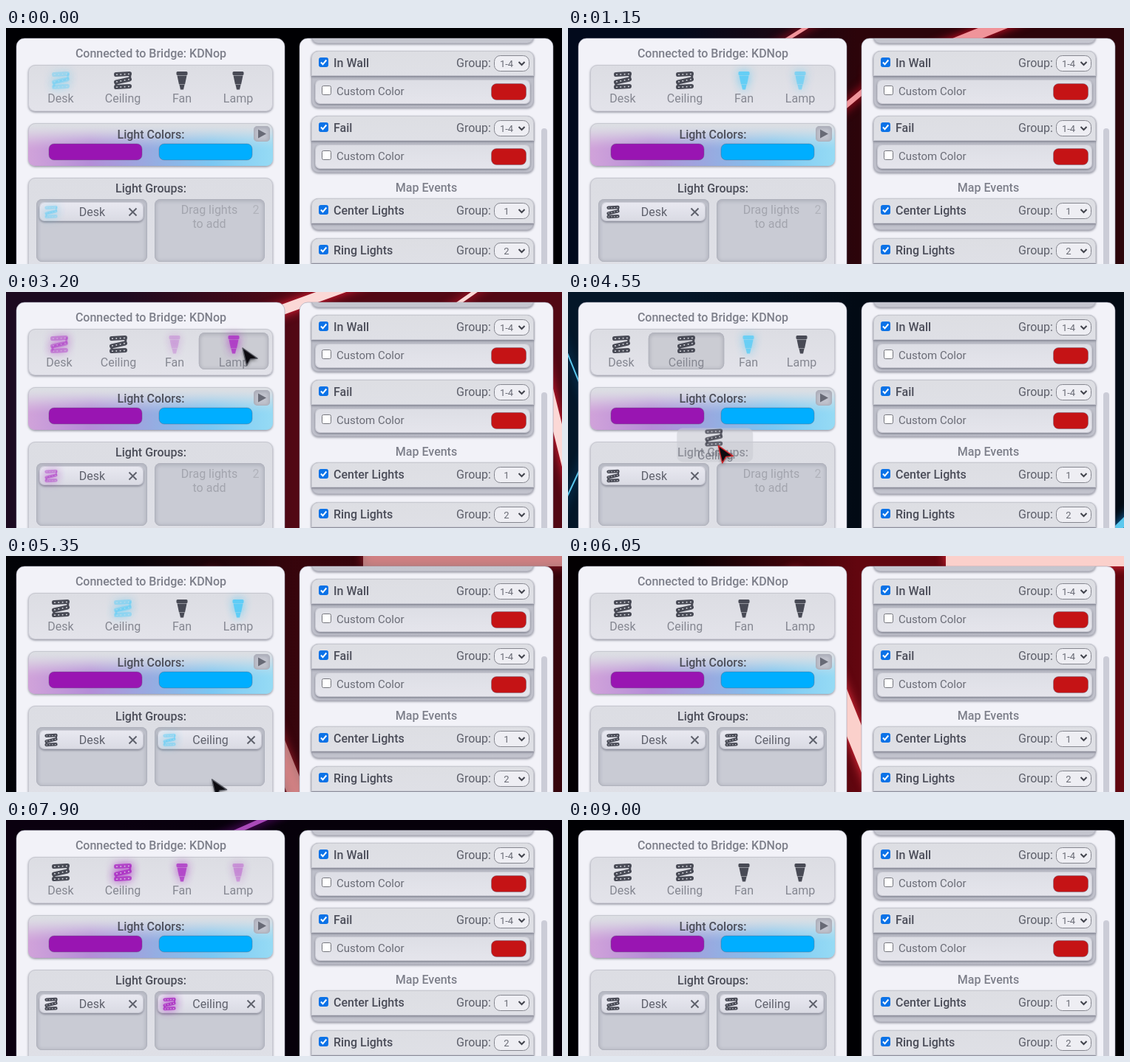
These frames come from a looping animation (752x320 px, 9050 ms). An HTML page with a canvas:

```html
<!DOCTYPE html>
<html lang="en">
<head>
<meta charset="utf-8">
<title>Light control panel</title>
<style>
html, body { margin: 0; width: 100%; height: 100%; overflow: hidden; background: #000; }
canvas { display: block; width: 100vw; height: 100vh; }
</style>
</head>
<body>
<canvas id="stage" width="752" height="320"></canvas>
<script>
const ctx = document.getElementById('stage').getContext('2d');
const LOOP = 9050, STEP = 50, PULSE = 500;
const CYAN = '#58cdf8', PURPLE = '#ae35c6', DARK = '#484a55';

// Each lamp flashes at its own rhythm
const LAMPS = [
  { name: 'Desk', x: 74, period: 3250, phase: 400, paint: strip },
  { name: 'Ceiling', x: 158, period: 2800, phase: 600, paint: strip },
  { name: 'Fan', x: 238, period: 1680, phase: 630, paint: bulb },
  { name: 'Lamp', x: 314, period: 2200, phase: 1300, paint: bulb }
];

// Pointer stops; it rests at each before moving on
const REST = 200;
const STOPS = [
  { at: 2600, x: 345, y: 350 },
  { at: 3150, x: 320, y: 76 },
  { at: 3900, x: 164, y: 79 },
  { at: 5000, x: 275, y: 262 },
  { at: 5700, x: 310, y: 350 }
];
const PICK = STOPS[2], GRAB = PICK.at + REST, DROP = STOPS[3].at + REST / 2;

// Backdrop moods; rays are x, y, degrees, width
const MOODS = [
  { at: 1150, left: '#020a1c', right: '#2c040a', ray: '#f0949a', glow: '#e01028',
    rays: [[308, 8, -32, 5], [555, 8, -22, 15], [388, 95, -40, 7]] },
  { at: 3200, left: '#1c0a20', right: '#520814', ray: '#fbd8d6', glow: '#f02038',
    rays: [[415, 9, -20, 14], [745, 180, 76, 14], [625, 6, -35, 5]] },
  { at: 4550, left: '#041628', right: '#020a14', ray: '#5cc8ee', glow: '#1080d0',
    rays: [[6, 100, 68, 2], [6, 262, -65, 2], [748, 316, -45, 10]] },
  { at: 6050, left: '#030002', right: '#62060f', ray: '#fbd0cb', glow: '#f03040',
    rays: [[387, 237, 68, 24], [775, 0, 0, 28]] },
  { at: 7900, left: '#0a000f', right: '#06000a', ray: '#a94aba', glow: '#8a10a8',
    rays: [[340, 3, -24, 6]] }
];

const clamp = v => Math.max(0, Math.min(1, v));
const ease = v => { v = clamp(v); return v * v * (3 - 2 * v); };

function box(x, y, w, h, r) {
  ctx.beginPath();
  ctx.roundRect(x, y, w, h, r);
}

function lines(points, close) {
  ctx.beginPath();
  points.forEach(p => ctx.lineTo(p[0], p[1]));
  if (close) ctx.closePath();
}

function gradient(x1, y1, x2, y2, ...colors) {
  const g = ctx.createLinearGradient(x1, y1, x2, y2);
  colors.forEach((c, i) => g.addColorStop(i / (colors.length - 1), c));
  return g;
}

function shade(color, blur, dy = 0) {
  ctx.shadowColor = color;
  ctx.shadowBlur = blur;
  ctx.shadowOffsetY = dy;
}

function stroke(color, width) {
  ctx.strokeStyle = color;
  ctx.lineWidth = width;
  ctx.stroke();
}

function fill(color) {
  ctx.fillStyle = color;
  ctx.fill();
}

function raised(x, y, w, h, r, top = '#dcdde3', bottom = '#e3e3ea') {
  ctx.save();
  shade('rgba(60,62,80,.5)', 3, 1.5);
  box(x, y, w, h, r);
  fill(gradient(0, y, 0, y + h, top, bottom));
  ctx.restore();
  box(x + .5, y + .5, w - 1, h - 1, r);
  stroke('rgba(130,132,148,.25)', 1);
}

function sunken(x, y, w, h, r, color) {
  ctx.save();
  box(x, y, w, h, r);
  fill(color);
  ctx.clip();
  shade('rgba(70,72,90,.5)', 5, 1);
  box(x - .5, y - .5, w + 1, h + 1, r);
  stroke('#a9abb6', 2);
  ctx.restore();
}

function text(str, x, y, color, align = 'left', weight = 400, size = 16) {
  ctx.font = `${weight} ${size}px Roboto, sans-serif`;
  ctx.textAlign = align;
  ctx.fillStyle = color;
  ctx.fillText(str, x, y);
}

function backdrop(t) {
  ctx.fillStyle = '#000003';
  ctx.fillRect(0, 0, 752, 320);
  for (const { at, left, right, ray, glow, rays } of MOODS) {
    ctx.save();
    ctx.globalAlpha = clamp(2.5 * (1 - Math.abs(t - at) / 900));
    ctx.fillStyle = gradient(150, 0, 390, 0, left, right);
    ctx.fillRect(0, 0, 752, 320);
    shade(glow, 14);
    for (const [x, y, angle, w] of rays) {
      ctx.save();
      ctx.translate(x + (t - at) * .04, y);
      ctx.rotate(angle * Math.PI / 180);
      const reach = 40 + 8 * w;
      lines([[-reach, 0], [reach, 0]]);
      stroke(ray, w);
      ctx.restore();
    }
    ctx.restore();
  }
}

function strip(color) {
  ctx.lineCap = ctx.lineJoin = 'round';
  lines([[10, -8.5], [9.5, -2], [-9, 3], [-9, 8.5]]);
  stroke(color, 3);
  for (const [left, right] of [[-8, -9], [2.5, -1.5], [9, 8]]) {
    lines([[-9, left], [9, right]]);
    stroke(color, 6);
  }
  shade('transparent', 0);
  ctx.fillStyle = '#e2e3e9';
  for (let i = 0; i < 12; i++) {
    const x = -8 + 5.3 * (i % 4), row = Math.floor(i / 4) - 1;
    ctx.fillRect(x - .8, row * 8.5 - x * (row ? .05 : .2) - .5, 1.6, 1.6);
  }
}

function bulb(color) {
  box(-7.5, -12, 15, 5, 1.5);
  fill(color);
  lines([[-6.5, -6.5], [6.5, -6.5], [4, 5.5], [-4, 5.5]], true);
  fill(color);
  lines([[-3.5, 6], [3.5, 6], [2, 12.5], [-2, 12.5]], true);
  fill(color);
}

function icon(lamp, x, y, t, scale = 1) {
  const age = (t + lamp.phase) % lamp.period, lit = age < PULSE;
  const beat = (t - age + LOOP) % LOOP % 5000;
  const color = !lit ? DARK : t > age && beat >= 2400 && beat < 3700 ? PURPLE : CYAN;
  ctx.save();
  ctx.translate(x, y);
  ctx.scale(scale, scale);
  if (lit) {
    ctx.globalAlpha = 1 - .8 * age / PULSE;
    shade(color, 12);
  }
  lamp.paint(color);
  ctx.restore();
}

function pointerAt(t) {
  const i = STOPS.findIndex(s => s.at > t);
  if (i < 1) return null;
  const a = STOPS[i - 1], b = STOPS[i], from = a.at + REST;
  const k = ease((t - from) / (b.at - from));
  // Height leads, so moves follow an arc
  return { x: a.x + (b.x - a.x) * k ** 1.5, y: a.y + (b.y - a.y) * k ** .5 };
}

const isDragging = t => t >= GRAB && t < DROP;

function lampRow(t, pointer) {
  raised(30, 50, 331, 63, 9);
  const focus = isDragging(t) ? PICK : pointer;
  const last = LAMPS.length - 1;
  const hover = LAMPS.map(l => focus && focus.y < 113 ? ease((46 - Math.abs(focus.x - l.x)) / 16) : 0);
  // The hovered tile widens by what the others give up
  const shift = (i, h) => i < h ? -4 * i - 2 : i > h ? 4 * (last - i) + 2 : 2 * last - 4 * h;
  LAMPS.forEach((lamp, i) => {
    const x = hover.reduce((sum, w, h) => sum + w * shift(i, h), lamp.x);
    ctx.font = '16px Roboto, sans-serif';
    const w = ctx.measureText(lamp.name).width + 54;
    ctx.save();
    ctx.globalAlpha = hover[i];
    if (hover[i]) sunken(x - w / 2, 55, w, 50, 8, '#cbccd3');
    ctx.restore();
    icon(lamp, x, 71, t);
    text(lamp.name, x, 101, '#858791', 'center');
  });
}

function swatch(x, y, w, h, color) {
  box(x, y, w, h, 7);
  fill(color);
  stroke('rgba(90,90,115,.4)', 1);
}

function colorBox() {
  raised(30, 129, 331, 58, 9, '#dcdee3', '#dfe2e9');
  ctx.save();
  box(30, 129, 331, 58, 9);
  ctx.clip();
  // Thin rows fade the tint in from the top
  ctx.fillStyle = gradient(30, 0, 361, 0, '#cf9cd8', '#b083d6', '#8fa5e0', '#6fc4f4', '#8edaf6');
  for (let y = 129; y < 187; y++) {
    ctx.globalAlpha = .9 * ease((y - 129) / 38);
    ctx.fillRect(30, y, 331, 1);
  }
  ctx.restore();
  swatch(58, 157, 126, 22, '#9915b2');
  swatch(207, 157, 126, 22, '#00aeff');
  text('Light Colors:', 196, 150, '#4c4e59', 'center', 500);
  sunken(335, 133, 22, 21, 5, '#c2c4ce');
  lines([[341, 137.5], [352, 143.5], [341, 149.5]], true);
  fill('#686a76');
}

function chip(lamp, x, t) {
  raised(x, 236, 141, 26, 7, '#e9e9f1', '#d9dae3');
  icon(lamp, x + 16, 249.5, t, .72);
  text(lamp.name, x + 71.5, 255, '#5f616c', 'center');
  for (const s of [-5, 5]) {
    lines([[x + 121.5, 249.5 - s], [x + 131.5, 249.5 + s]]);
    stroke('#5f616c', 2);
  }
}

function groupBox(t) {
  const dropped = t >= DROP, h = dropped ? 80 : 85;
  raised(30, 203, 331, 140, 9, '#dcdde3', '#dfe0e7');
  text('Light Groups:', 196, 223, '#4c4e59', 'center', 500);
  sunken(41, 232, 150, h, 8, '#c9cbd4');
  sunken(201, 232, 149, h, 8, '#c9cbd4');
  chip(LAMPS[0], 45, t);
  if (dropped) {
    chip(LAMPS[1], 205, t);
  } else {
    text('Drag lights', 275, 252, '#a3a5ae', 'center');
    text('to add', 275, 271, '#a3a5ae', 'center');
    text('2', 338, 252, '#b1b3bb', 'center');
  }
}

function checkbox(x, y, on) {
  box(x + .5, y + .5, 12, 12, 2);
  fill(on ? '#0b72e7' : '#fff');
  stroke(on ? '#0b72e7' : '#74757c', 1);
  if (!on) return;
  lines([[x + 3, y + 6.5], [x + 5.5, y + 9.3], [x + 10.3, y + 3.5]]);
  stroke('#fff', 2);
}

function eventBox(y, name, group, custom) {
  raised(413, y, 301, custom ? 77 : 43, 9, '#b9bbc5', '#c2c3cd');
  raised(413, y, 301, 34, [9, 9, 0, 0], '#dddee3', '#dfe0e6');
  checkbox(423, y + 9, true);
  text(name, 443, y + 22, '#4b4d59', 'left', 500);
  text('Group:', 609, y + 22, '#5e606b');
  box(660.5, y + 6.5, 47, 21, 8);
  fill('#eeeef3');
  stroke('#85868f', 1);
  text(group, 677, y + 22, '#686a74', 'center', 400, 13);
  lines([[693.5, y + 15], [697.5, y + 19], [701.5, y + 15]]);
  stroke('#41434c', 2);
  if (!custom) return;
  raised(418, y + 39, 291, 33, 7, '#dddee5', '#e5e5ec');
  checkbox(427, y + 47, false);
  text('Custom Color', 447, y + 60, '#6a6c76', 'left', 400, 15);
  swatch(656.5, y + 44.5, 47, 22, '#c51315');
}

function panel(x, w, content) {
  ctx.save();
  box(x, 14, w, 330, 11);
  fill('#f2f2f8');
  stroke('rgba(150,152,170,.55)', 1);
  ctx.clip();
  content();
  ctx.restore();
}

function mapEvents() {
  raised(413, -20, 301, 41, 9, '#b9bbc5', '#c6c7d0');
  eventBox(31, 'In Wall', '1-4', true);
  eventBox(119, 'Fail', '1-4', true);
  text('Map Events', 568.5, 222, '#7d7f8a', 'center', 500);
  eventBox(231, 'Center Lights', '1', false);
  eventBox(285, 'Ring Lights', '2', false);
  box(724, 136, 8, 220, 4);
  fill('#cbccd7');
}

function ghost(t) {
  ctx.save();
  ctx.globalAlpha = .55;
  box(-56, -24, 103, 46, 8);
  fill('#c9cad2');
  ctx.globalAlpha = .8;
  icon(LAMPS[1], -6, -11, t);
  text('Ceiling', -4, 19, '#6d6f7a', 'center');
  ctx.restore();
}

function cursor(t, { x, y }) {
  const dragging = isDragging(t);
  ctx.save();
  ctx.translate(x, y);
  if (dragging) ghost(t);
  shade('rgba(0,0,0,.45)', 4, 2);
  lines([[0, 0], [20, 14], [10.5, 15], [5.5, 23.5]], true);
  fill('#0c0b10');
  shade('transparent', 0);
  ctx.lineJoin = 'round';
  stroke(dragging ? '#d3262c' : '#54565f', 1.4);
  ctx.restore();
}

function draw(t) {
  const pointer = pointerAt(t);
  backdrop(t);
  panel(14, 363, () => {
    text('Connected to Bridge: KDNop', 196, 40, '#7d7f8a', 'center', 500);
    lampRow(t, pointer);
    colorBox();
    groupBox(t);
  });
  panel(397, 343, mapEvents);
  if (pointer) cursor(t, pointer);
}

const start = performance.now();
function frame() {
  const elapsed = (performance.now() - start) % LOOP;
  draw(Math.floor(elapsed / STEP) * STEP);
  requestAnimationFrame(frame);
}
frame();
</script>
</body>
</html>
```
